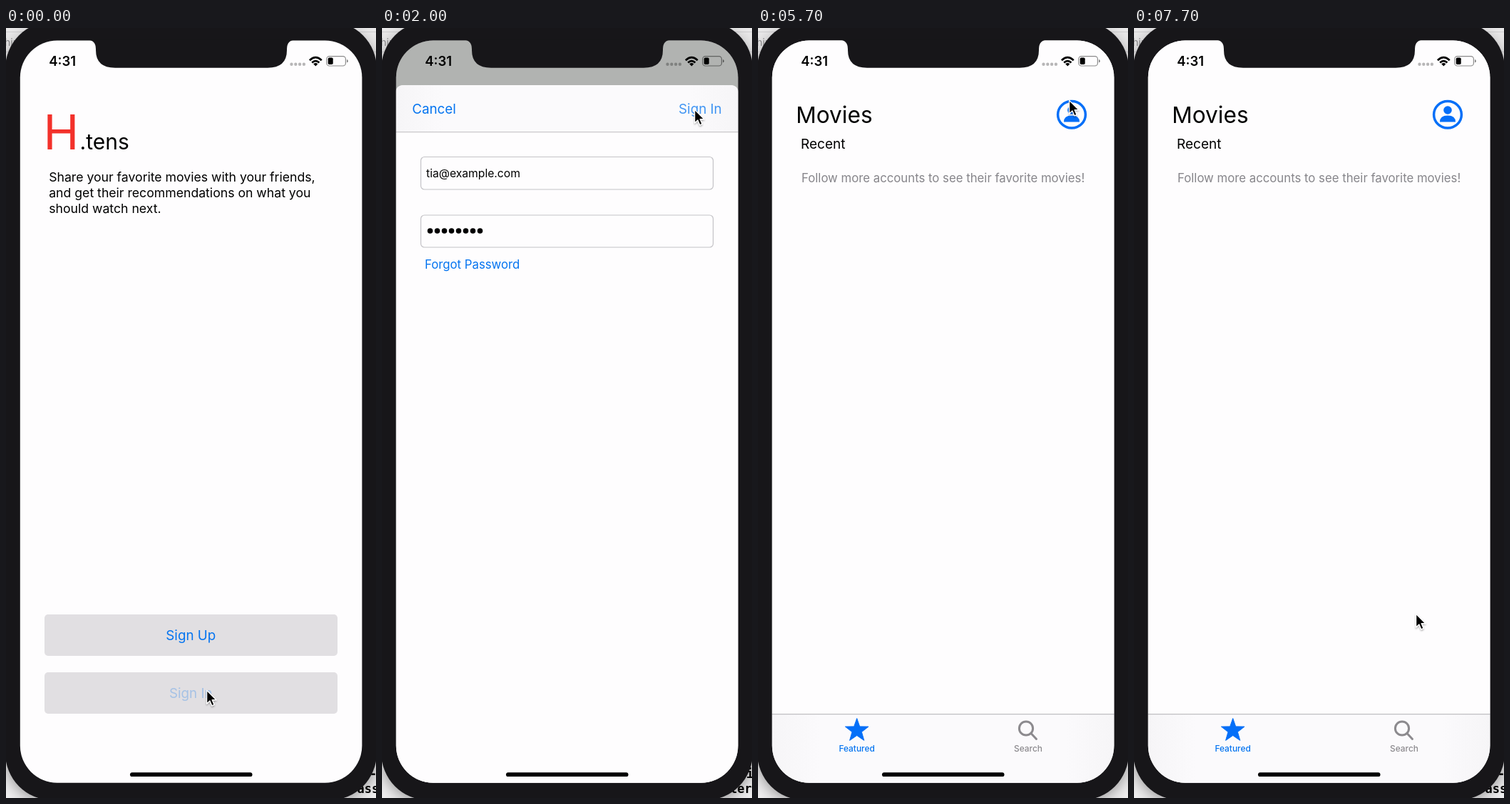
An HTML page for the animation above (7800 ms loop, 519 by 1078 pixels).

```html
<!DOCTYPE html>
<html lang="en">
<head>
<meta charset="utf-8">
<title>Movie app walkthrough</title>
<style>
html, body { margin: 0; width: 100%; height: 100%; overflow: hidden; background: #e9e8e9; }
svg { display: block; width: 519px; height: 1078px; }
text { font-family: Inter, "Open Sans", sans-serif; font-size: 18.8px; fill: #000; white-space: pre; }
.blue { fill: #0474f0; }
.grey { fill: #86858a; font-size: 16.75px; }
.mid { text-anchor: middle; }
.end { text-anchor: end; }
.intro text { font-size: 17.65px; }
.tab { font-size: 11.9px; font-weight: 500; text-anchor: middle; }
.log text { font: bold 17px "DejaVu Sans Mono", monospace; }

.anim, .anim-step { animation: 7.8s infinite linear; }
.anim-step { animation-timing-function: step-end; }

/* Modal movement */
.signin { animation-name: signin; }
.movies { animation-name: movies; }
.profile { animation-name: profile; }
.dim1 { animation-name: dim1; }
.dim2 { animation-name: dim2; }
@keyframes signin {
  0%, 2.56% { transform: translateY(990px); animation-timing-function: cubic-bezier(.25,.67,.25,1); }
  10.26%, 100% { transform: none; }
}
@keyframes movies {
  0%, 32.05% { transform: translateY(1042px); animation-timing-function: cubic-bezier(.25,.67,.25,1); }
  39.74%, 100% { transform: none; }
}
@keyframes profile {
  0%, 73.72% { transform: translateY(990px); animation-timing-function: cubic-bezier(.25,.67,.25,1); }
  80.77%, 92.95% { transform: none; animation-timing-function: cubic-bezier(.25,.67,.25,1); }
  98.08%, 100% { transform: translateY(990px); }
}
@keyframes dim1 {
  0%, 2.56% { opacity: 0; animation-timing-function: ease-out; }
  9%, 100% { opacity: .3; }
}
@keyframes dim2 {
  0%, 73.72% { opacity: 0; animation-timing-function: ease-out; }
  80%, 92.95% { opacity: .3; animation-timing-function: ease-out; }
  98.08%, 100% { opacity: 0; }
}

/* Button presses */
.press-open { animation-name: press-open; }
.press-in { animation-name: press-in; }
.press-done { animation-name: press-done; }
@keyframes press-open { 0%, 1.28% { opacity: .27; } 5.13%, 100% { opacity: 1; } }
@keyframes press-in {
  0%, 21.75% { opacity: 1; }
  21.79%, 23.08% { opacity: .25; }
  26.92%, 100% { opacity: 1; }
}
@keyframes press-done {
  0%, 90.98% { opacity: 1; }
  91.03%, 93.5% { opacity: .25; }
  96.15%, 100% { opacity: 1; }
}

/* Pointer */
.pointer { animation-name: pointer; }
@keyframes pointer {
  0%, 1.28% { transform: translate(282px, 928px); animation-timing-function: ease-in-out; }
  10.26% { transform: translate(408px, 112px); animation-timing-function: ease-out; }
  12.82% { transform: translate(419px, 87px); animation-timing-function: ease-in-out; }
  20.51%, 39.7% { transform: translate(439px, 115px); visibility: visible; }
  39.74%, 53.8% { transform: translate(445px, -26px); visibility: hidden; }
  53.85% { transform: translate(445px, -26px); visibility: visible; }
  56.41% { transform: translate(446px, 7px); }
  61.54% { transform: translate(440px, 72px); animation-timing-function: ease-out; }
  67.95%, 75% { transform: translate(437px, 102px); animation-timing-function: ease-in-out; }
  89.74%, 93.59% { transform: translate(446px, 112px); animation-timing-function: ease-in-out; }
  98.72%, 100% { transform: translate(396px, 821px); }
}

/* Log lines behind the device */
.log-a { animation-name: log-a; }
.log-b { animation-name: log-b; }
.log-c { animation-name: log-c; }
@keyframes log-a { 0% { opacity: 1; } 5.13% { opacity: 0; } 76.92%, 100% { opacity: 1; } }
@keyframes log-b { 0% { opacity: 0; } 5.13% { opacity: 1; } 34.61%, 100% { opacity: 0; } }
@keyframes log-c { 0% { opacity: 0; } 34.61% { opacity: 1; } 71.79%, 100% { opacity: 0; } }
</style>
</head>
<body>
<svg viewBox="0 0 519 1078" xmlns="http://www.w3.org/2000/svg">
  <defs>
    <clipPath id="screen"><rect x="19.8" y="17.5" width="479.6" height="1039.2" rx="52"/></clipPath>
    <filter id="soft" x="-20%" y="-20%" width="140%" height="140%"><feGaussianBlur stdDeviation="11"/></filter>
    <filter id="drop" x="-50%" y="-50%" width="200%" height="200%">
      <feDropShadow dx="0" dy="1.5" stdDeviation="1.2" flood-opacity=".35"/>
    </filter>
    <linearGradient id="bar">
      <stop offset="0" stop-color="#f6f5f7"/><stop offset=".14" stop-color="#fbfafc"/>
      <stop offset=".86" stop-color="#fbfafc"/><stop offset="1" stop-color="#f6f5f7"/>
    </linearGradient>
    <g id="card">
      <path d="M19 1080V92Q19 80 31 80H488Q500 80 500 92V1080Z" fill="#fefdfe"/>
      <path d="M19 146V92Q19 80 31 80H488Q500 80 500 92V146Z" fill="url(#bar)"/>
      <path d="M19 145.7H500" stroke="#c9c8ca" stroke-width="1.3"/>
    </g>
  </defs>

  <!-- Desktop -->
  <rect width="519" height="1078" fill="#e9e8e9"/>
  <path d="M0 5.5H519M0 33.5H519" stroke="#cfced0"/>
  <text x="-2" y="25" style="font-size:14px;fill:#8c8b8d">hir</text>
  <rect y="1000" width="519" height="78" fill="#f1f0f1"/>
  <rect x="-1" y="2" width="521" height="1082" rx="66" fill="#000" opacity=".42" filter="url(#soft)"/>
  <g class="log">
    <g class="log-a anim-step"><text x="510" y="1050">-</text><text x="492.5" y="1071">ass</text></g>
    <g class="log-b anim-step"><text x="511" y="1050">i</text><text x="488" y="1071">ler</text></g>
    <g class="log-c anim-step"><text x="510" y="1050">n</text><text x="484" y="1071">ult</text></g>
  </g>

  <!-- Device -->
  <rect x="-1" y="-9" width="521" height="1090" rx="66" fill="#171619"/>
  <g clip-path="url(#screen)">
    <rect x="19" y="17" width="481" height="1041" fill="#fefdfe"/>

    <!-- Welcome -->
    <text x="52.5" y="170" style="font-size:67px;fill:#f3312b">H</text>
    <text x="103.5" y="170" style="font-size:30px">.tens</text>
    <g class="intro">
      <text x="60.2" y="214.5">Share your favorite movies with your friends,</text>
      <text x="60.2" y="236.5">and get their recommendations on what you</text>
      <text x="60.2" y="258.5">should watch next.</text>
    </g>
    <rect x="54" y="821" width="411" height="58" rx="5" fill="#e1dfe2"/>
    <rect x="54" y="902" width="411" height="58" rx="5" fill="#e1dfe2"/>
    <text class="blue mid" x="259.3" y="856.5">Sign Up</text>
    <text class="blue mid press-open anim" x="259.3" y="937.5">Sign In</text>

    <!-- Sign in -->
    <rect class="dim1 anim" x="19" y="17" width="481" height="1041" fill="#000a00"/>
    <g class="signin anim">
      <use href="#card"/>
      <text class="blue" x="42.2" y="119.7">Cancel</text>
      <text class="blue end press-in anim" x="476.7" y="119.7">Sign In</text>
      <g fill="#fefdfe" stroke="#c4c3c7" stroke-width="1.2">
        <rect x="54.5" y="180.5" width="410" height="45.5" rx="5"/>
        <rect x="54.5" y="262" width="410" height="45" rx="5"/>
      </g>
      <text x="62" y="208.5" style="font-size:15.7px">tia@example.com</text>
      <path d="M67.5 284H138" stroke="#000" stroke-width="7.6" stroke-linecap="round" stroke-dasharray="0 10"/>
      <text class="blue" x="60" y="337" style="font-size:16.75px">Forgot Password</text>
    </g>

    <!-- Movies -->
    <g class="movies anim">
      <rect x="19" y="17" width="481" height="1042" fill="#fefdfe"/>
      <text x="53.2" y="133" style="font-size:31.6px">Movies</text>
      <text x="60" y="169" style="font-size:19px">Recent</text>
      <text class="grey" x="61" y="215.5">Follow more accounts to see their favorite movies!</text>
      <g fill="#046ff8">
        <ellipse cx="440" cy="121.3" rx="19.4" ry="18.8" fill="none" stroke="#046ff8" stroke-width="3.5"/>
        <circle cx="440" cy="115" r="5.8"/>
        <path d="M429 131.5Q429 122.5 440 122.5T451 131.5Z"/>
      </g>
      <rect x="19" y="960" width="481" height="98" fill="url(#bar)"/>
      <path d="M19 960.6H500" stroke="#bfbec1" stroke-width="1.2"/>
      <path d="M138.7 966.5l4 11.4 12.3.2-9.6 7.5 3.4 11.8-10.1-6.9-10.1 6.9 3.4-11.8-9.6-7.5 12.3-.2z"
            fill="#046ff8" stroke="#046ff8" stroke-linejoin="round"/>
      <text class="tab blue" x="138.6" y="1013">Featured</text>
      <g fill="none" stroke="#8c8a8e" stroke-width="3">
        <circle cx="376" cy="980.5" r="9.6"/>
        <path d="M383 987.5l7.5 8" stroke-linecap="round"/>
      </g>
      <text class="tab" x="379" y="1013" style="fill:#8c8a8e">Search</text>
    </g>

    <!-- Profile -->
    <rect class="dim2 anim" x="19" y="17" width="481" height="1041" fill="#000a00"/>
    <g class="profile anim">
      <use href="#card"/>
      <text class="blue" x="42.2" y="119.7">Sign Out</text>
      <text class="blue end press-done anim" x="476.7" y="119.7">Done</text>
      <path d="M212 314A75.5 75.5 0 1 1 307 314Q297 278 273 265.5H246Q222 278 212 314Z" fill="#8f8d90"/>
      <circle cx="259.5" cy="238" r="31" fill="#fefdfe"/>
      <text class="mid" x="259.3" y="382" style="font-size:26.5px">Tia Belivara</text>
      <text class="mid" x="259.3" y="424.5">tia@example.com</text>
      <text x="59.6" y="466">My Movies</text>
      <text class="grey mid" x="259.3" y="512.3">No movies yet!</text>
    </g>

    <!-- Status bar -->
    <text x="60.2" y="53" style="font-size:18.5px;font-weight:600">4:31</text>
    <path d="M400.5 50.7H418.5" stroke="#000" stroke-opacity=".28" stroke-width="4.4" stroke-linecap="round" stroke-dasharray="0 5.8"/>
    <g fill="none" stroke="#000" stroke-width="2.7">
      <path d="M425.9 45.2Q434.3 37.2 442.7 45.2"/>
      <path d="M429.2 48.6Q434.3 43.8 439.4 48.6"/>
    </g>
    <path d="M431.2 50.2Q434.3 47.8 437.4 50.2L434.3 53.4Z"/>
    <rect x="449.8" y="39.6" width="26.6" height="13.4" rx="3.8" fill="none" stroke="#000" stroke-opacity=".45" stroke-width="1.2"/>
    <rect x="451.7" y="41.5" width="7" height="9.6" rx="1.8"/>
    <path d="M478 44q1.8.6 1.8 2.3T478 48.6z" fill-opacity=".5"/>
    <rect x="174" y="1042.3" width="171.5" height="5.8" rx="2.9"/>
  </g>
  <path d="M113 16.5q13 0 13 13v1.5q0 24.7 27 24.7H367q27 0 27-24.7v-1.5q0-13 13-13z" fill="#171619"/>

  <g class="pointer anim">
    <path d="M0 0V18.6L4.3 14.5L7.2 21.4L10.5 20L7.6 13.3H13.4Z" transform="translate(-.4 -.6)"
          stroke="#fff" stroke-width="1.3" stroke-linejoin="round" filter="url(#drop)"/>
  </g>
</svg>
</body>
</html>
```
